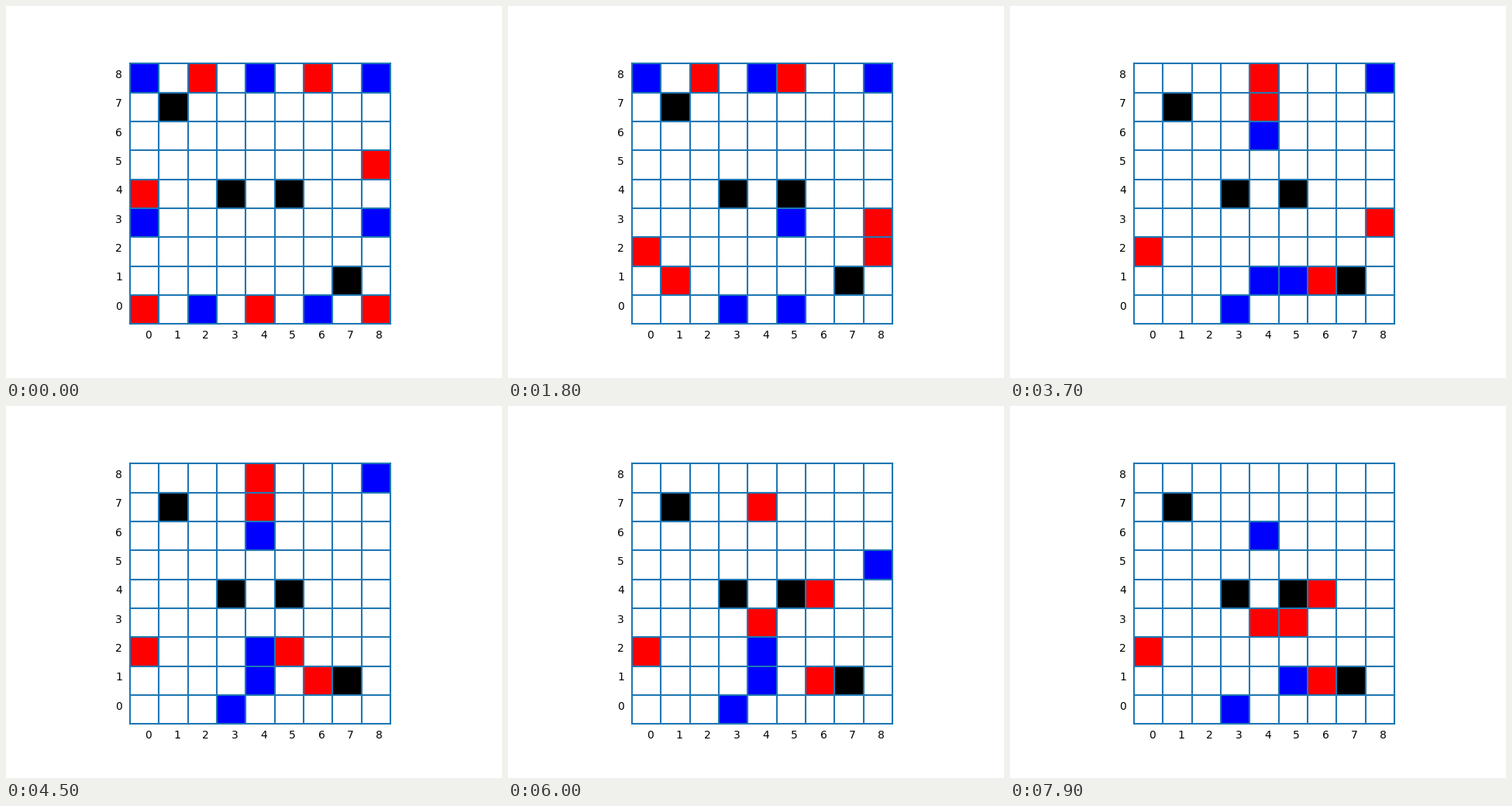
Recreate the animation shown at these times as a matplotlib script. Size 640 px wide and 480 px high, loop 8000 ms.

```python
import matplotlib.pyplot as plt
from matplotlib.animation import FuncAnimation
from matplotlib.patches import Rectangle

N = 9
STEPS = {"N": (0, 1), "S": (0, -1), "E": (1, 0), "W": (-1, 0)}

START = {
    "blue": "08 48 88 03 83 20 60",
    "red": "28 68 85 04 00 40 80",
    "black": "17 34 54 71",
}
# Each run is a starting cell followed by single steps of that piece.
BLUE_RUNS = ("20E 60W 83W 03ES 73WWSN 08SSEEEE 53WSS 50N 41N 51W 42NS "
             "88SSSSSNNWWWWN 41EWEWE")
RED_RUNS = ("85S 80NN 04SS 00NE 84S 68W 28E 58SW 38E 11EE 82WWS 83WWSW "
            "52NW 48ESS 56ESS 64SWSN 47ESESS")


def shift(cell, step):
    return cell[0] + step[0], cell[1] + step[1]


def parse_cell(text):
    return int(text[0]), int(text[1])


def expand(runs):
    for run in runs.split():
        cell = parse_cell(run)
        for key in run[2:]:
            target = shift(cell, STEPS[key])
            yield cell, target
            cell = target


def play(board, src, dst):
    """Move a piece, then remove enemies touched by two or more of its side."""
    board = dict(board)
    side = board[dst] = board.pop(src)
    enemy = "red" if side == "blue" else "blue"
    taken = [c for c, color in board.items() if color == enemy
             and sum(board.get(shift(c, s)) == side
                     for s in STEPS.values()) >= 2]
    for c in taken:
        del board[c]
    return board


def build_game():
    board = {parse_cell(c): color
             for color, cells in START.items() for c in cells.split()}
    boards = [board]
    blue, red = expand(BLUE_RUNS), expand(RED_RUNS)
    for turn in range(79):
        boards.append(play(boards[-1], *next(red if turn % 2 else blue)))
    return boards


boards = build_game()

fig, ax = plt.subplots(figsize=(6.4, 4.8), dpi=100)
ax.set_aspect("equal")
ax.set_xlim(-0.45, N + 0.45)
ax.set_ylim(-0.45, N + 0.45)
ax.axis("off")

tiles = {(x, y): ax.add_patch(Rectangle((x, y), 1, 1, fc="white", lw=0))
         for x in range(N) for y in range(N)}
for i in range(N + 1):
    ax.plot([i, i], [0, N], color="C0", lw=1.5)
    ax.plot([0, N], [i, i], color="C0", lw=1.5)
for i in range(N):
    ax.text(i + 0.5, -0.5, str(i))
    ax.text(-0.5, i + 0.5, str(i))


def update(frame):
    for cell, tile in tiles.items():
        tile.set_facecolor(boards[frame].get(cell, "white"))
    return list(tiles.values())


anim = FuncAnimation(fig, update, frames=len(boards), interval=100,
                     repeat=True, repeat_delay=0)
plt.show()
```
